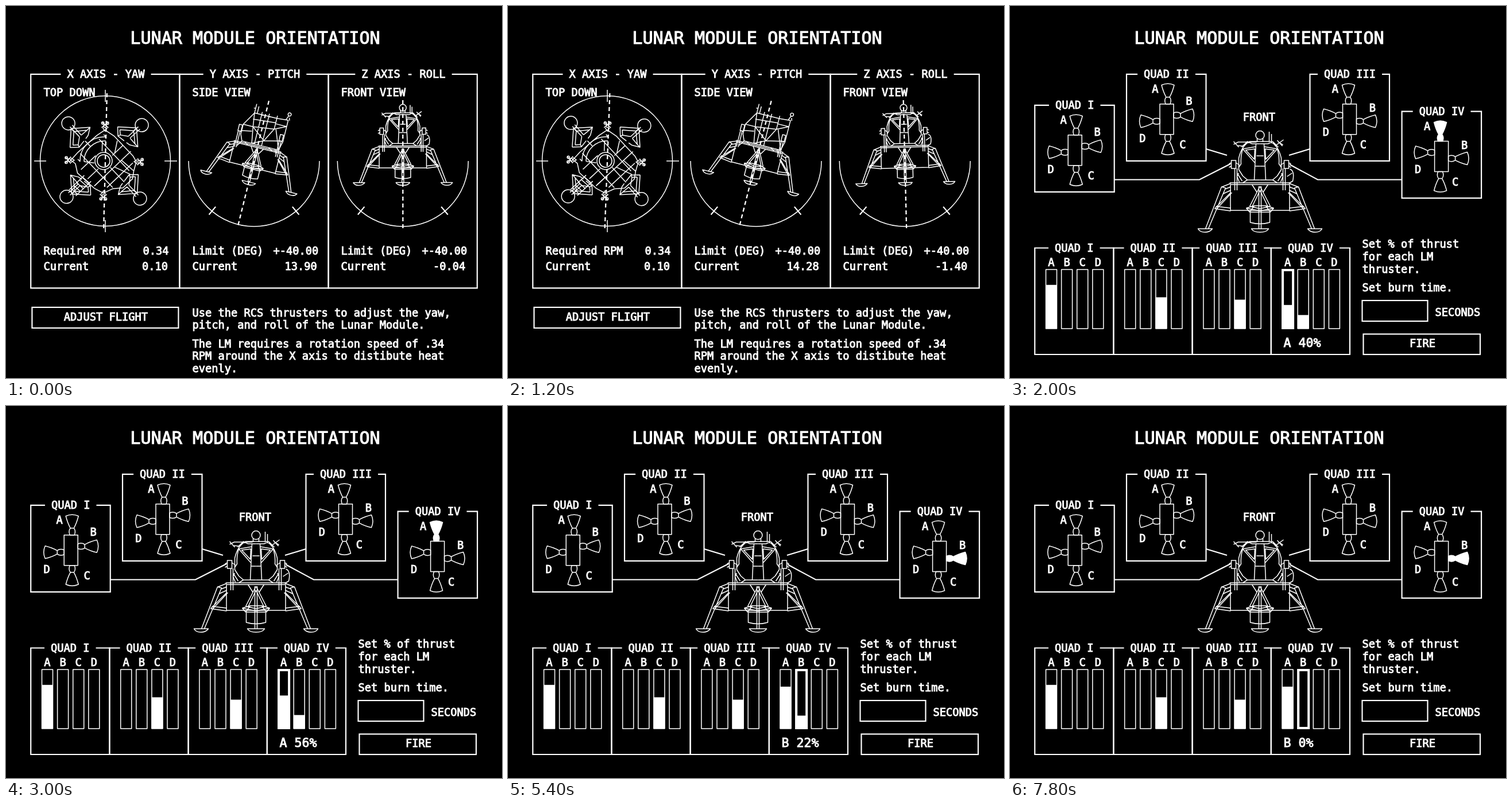
These frames come from a looping animation (864 px wide and 648 px high, 8000 ms). An HTML page:

```html
<!DOCTYPE html>
<html lang="en">
<head>
<meta charset="utf-8">
<title>Lunar Module Orientation</title>
<style>
html, body { margin: 0; width: 100%; height: 100%; overflow: hidden; background: #000; }
svg { display: block; width: 100%; height: 100%; fill: none; stroke: #fff; stroke-width: 2.16; }
text { font: 18.7px "DejaVu Sans Mono", monospace; fill: #fff; stroke-width: .95; white-space: pre; }
.mid { text-anchor: middle; }
.title { font-size: 30.15px; stroke-width: 1.1; }
.level { font-size: 21.6px; }
.thin, .thin * { stroke-width: 1.5; vector-effect: non-scaling-stroke; }
.thin { stroke-linejoin: round; }
.axis { stroke-width: 2.3; stroke-dasharray: 7 5; }
.solid { fill: #fff; }
</style>
</head>
<body>
<svg id="stage" viewBox="0 0 864 648"></svg>
<script>
const LOOP = 8000, STEP = 200, CHAR = 11.26, ADJUST = 2000;
const stage = document.getElementById('stage');

const path = (d, attrs = '') => `<path d="${d}" ${attrs}/>`;
const rect = (x, y, w, h, attrs = '') => `<rect x="${x}" y="${y}" width="${w}" height="${h}" ${attrs}/>`;
const circle = (x, y, r) => `<circle cx="${x}" cy="${y}" r="${r}"/>`;
const label = (x, y, s, attrs = '') => `<text x="${x}" y="${y}" ${attrs}>${s}</text>`;
const mid = (x, y, s) => label(x, y, s, 'class="mid"');
const group = (transform, body, attrs = '') => `<g transform="${transform}" ${attrs}>${body}</g>`;
const mirror = d => path(d) + group('scale(-1 1)', path(d));
const clamp = v => Math.max(0, Math.min(1, v));

// Box whose top edge is broken by its heading
function titled(x, y, w, h, heading, cx = x + w / 2) {
  const gap = heading.length * CHAR / 2 + 11;
  return path(`M${cx - gap} ${y}H${x}V${y + h}H${x + w}V${y}H${cx + gap}`) + mid(cx, y + 6.5, heading);
}

// Spacecraft parts: origin on the rotation axis
const descent =
  rect(-51.5, -30, 103, 45) + path('M-53-33H53') +
  mirror('M60-24L67-26 95 47H90ZM83 47H108Q105 53 96 53T83 47ZM51-32L66-26M51-26L61-22M51-20L64-14M51 16L79 12M51 11L77 8M51-16L79 12M49-16L76 13') +
  mirror('M0-27L18 8M0-20L14 9M24 11L10 7H0M24 11L18 18H0M24 11L0 16M10 7L18 18M0 12L18 8M14-30L5-16') +
  path('M-2-27V47M2-27V47M-17 19V36Q0 41 17 36V19M-15 47H15Q12 53 0 53T-15 47Z');

const front = descent + circle(0, -116, 7.5) +
  mirror('M5-110V-104M0-105H18Q32-98 37-76V-56L30-45 22-38H0M0-101H14L22-105 32-95M7-101L10-38M6-80H0M8-62H0M9-92L25-90 10-74ZM7-96L30-92 9-68M30-92Q34-80 33-66L37-60') +
  mirror('M42-72H50V-58H42ZM40-58V-20M44-58V-20M36-64L42-68M37-50L40-44M40-50L31-36M40-44L36-34M50-68L54-66M50-62L54-60M22-38L30-33') +
  path('M-46-105L-37-95M-46-100L-38-104H-6M-40-98L-30-97-22-104M16-104V-122M20-104V-118M26-97L41-108M30-107L39-97M32-104L40-99M52-57Q61-54 57-36L50-32M56-50L47-44');

const side = descent +
  path('M-24-102H26L51-104V-56L46-36H-36L-42-50V-72ZM-24-102L-20-72 26-78V-108M-42-72H-20L-14-36M26-78L51-90M-20-72L10-48 26-78M10-48L46-56M10-48L-14-36M-8-108V-36M8-108V-36M26-90H51M30-78L46-36M-42-58L-20-62M-24-88L26-92') +
  path('M-24-102V-122M-18-102V-118M-28-112H-24M46-104L50-114M54-104L52-110') + circle(51, -117, 3.5) +
  path('M-50-70H-43V-56H-50ZM-49-56V-20M-45-56V-20M42-70H49V-56H42ZM43-56V-20M47-56V-20M-36-36L-44-24M38-36L44-24M-30-36L-22-31M24-36L32-31');

const leg = circle(64, -64, 11.5) +
  path('M58-61L41-44M61-57L44-41M22-60L55-59 58-26 44-29M26-55L50-54 53-31M22-60L23-44 34-36M26-55L27-46 41-44M44-29L38-33M53-31L44-41M23-44L27-46M50-54L55-59M53-31L58-26');
const jet = path('M-6-68L6-58M6-68L-6-58M-4-58L0-52 4-58') + circle(-4, -66, 2.2) + circle(4, -66, 2.2) + circle(0, -61, 2.5);
const corners = [0, 90, 180, 270].map(a => group(`rotate(${a})`, leg + jet)).join('');
const above = corners +
  path('M0-54L16-44 50-10 56 0 52 16 50 30 34 46 16 48 0 56-16 48-46 22-50 6-58 0-46-14-14-44Z') +
  path('M-42 2A42 42 0 0 1 2-42M-35 2A36 36 0 0 1 2-35M-46-2L-42 2M-2-46L2-42M-40 16L-15-9M-28 32L-10 14M14-10L32-28M-16 44L46-18M6 46L50 2') +
  path('M-10-38L44 16M-42-12L16 46M-34-34L-25-25M11 11L36 36M-4-17V-35M-17 4L-35 2M18 10L46 22M18-14L22-36M-16 44L4 24M30-2L52 16') +
  circle(-1, 0, 15) + circle(-1, 0, 11) +
  path('M-60 52L-34 26M-48 62L-22 36M-57 49L-45 59M-52 44L-40 54M-47 39L-35 49M-42 34L-30 44M-37 29L-25 39');

function dial(cx) {
  const tick = a => group(`rotate(${a})`, path('M0 104V122'));
  return group(`translate(${cx} 270)`, path('M-114 0A114 114 0 0 0 114 0', 'class="thin"') + tick(40) + tick(-40));
}

function attitude() {
  const craft = (id, cx, body, scale, y1, y2) => group(`translate(${cx} 270)`,
    `<g id="${id}">${group(scale, body, 'class="thin"')}${path(`M0 ${y1}V${y2}`, 'class="axis"')}</g>`);
  const rows = (x, name, limit, xLimit, xNow, id) =>
    label(x, 432.5, name) + label(xLimit, 432.5, limit) + label(x, 459.5, 'Current') + label(xNow, 459.5, '0.10', `id="${id}"`);
  const copy = [[541, 'Use the RCS thrusters to adjust the yaw,'], [562, 'pitch, and roll of the Lunar Module.'],
    [595, 'The LM requires a rotation speed of .34'], [616, 'RPM around the X axis to distibute heat'], [638, 'evenly.']];
  return titled(43.2, 118.8, 259.2, 372.6, 'X AXIS - YAW', 174) +
    titled(302.4, 118.8, 259.2, 372.6, 'Y AXIS - PITCH', 433.5) +
    titled(561.6, 118.8, 259.2, 372.6, 'Z AXIS - ROLL', 692.5) +
    label(65.5, 157, 'TOP DOWN') + label(324.5, 157, 'SIDE VIEW') + label(583.5, 157, 'FRONT VIEW') +
    group('translate(173 270)', circle(0, 0, 113.5) + path('M-124 0H-103M103 0H125M0-124V-103M0 103V124'), 'class="thin"') +
    dial(432) + dial(691.3) +
    craft('yaw', 173, above, 'translate(-2 0)', -118, 120) +
    craft('pitch', 432, side, 'scale(.8)', -108, 120) +
    craft('roll', 691.3, front, 'scale(.8)', -106, 120) +
    rows(65.5, 'Required RPM', '0.34', 238.5, 237, 'yawText') +
    rows(324.5, 'Limit (DEG)', '+-40.00', 465.5, 485.5, 'pitchText') +
    rows(583.5, 'Limit (DEG)', '+-40.00', 724.5, 744, 'rollText') +
    rect(45.4, 524.9, 255, 36) + mid(174, 548, 'ADJUST FLIGHT') +
    copy.map(([y, s]) => label(324.5, y, s)).join('');
}

const nozzle = 'M-11-33Q0-38 11-33Q8-21 3-12Q7-7 4 0H-4Q-7-7-3-12Q-8-21-11-33ZM-3-12H3';

// Thruster cluster; the right-hand pair is flipped
function quad(x, y, name, flip, id) {
  const at = (px, py, a, n) => group(`translate(${px} ${py}) rotate(${a})`, path(nozzle, `id="${id}${n}"`));
  const [left, right] = flip ? 'BD' : 'DB';
  const body = rect(58, 52, 24, 53) + at(72, 52, 0, 'A') + at(82, 71.5, 90, right) +
    at(72, 105, 180, 'C') + at(58, 82, -90, left);
  const marks = flip ? [44, 32, 109, 65, 93, 129, 28, 107] : [50, 32, 109, 53, 98, 129, 28, 118];
  return titled(x, y, 138.5, 151, name, x + 69.5) + group(`translate(${x} ${y})`,
    group(flip ? 'translate(139 0) scale(-1 1)' : '', body, 'class="thin"') +
    [...'ABCD'].map((c, i) => mid(marks[2 * i], marks[2 * i + 1], c)).join(''));
}

const BASE = 562, FULL = 103;
const bar = (x, pct, id = '') =>
  rect(x, BASE - FULL * pct / 100, 20, FULL * pct / 100, `class="solid" stroke="none" ${id && `id="${id}Fill"`}`) +
  rect(x + .5, BASE - FULL, 19, FULL, 'class="thin"') +
  (id && rect(x + 1.5, BASE - FULL + 1, 18, FULL - 2, `id="${id}Frame" stroke-width="4"`));

function thrust() {
  const levels = [[74, 0, 0, 0], [0, 0, 53, 0], [0, 0, 49, 0], [40, 23, 0, 0]];
  const names = ['QUAD I', 'QUAD II', 'QUAD III', 'QUAD IV'];
  const panels = levels.map((row, q) => {
    const x = 43.2 + 137.2 * q;
    return titled(x, 421.5, 137.2, 185.5, names[q]) + row.map((pct, i) => {
      const bx = x + 18.8 + 27.1 * i;
      return bar(bx, pct, q === 3 && i < 2 ? 'bar' + 'AB'[i] : '') + mid(bx + 10, 453, 'ABCD'[i]);
    }).join('');
  }).join('');
  const copy = [[421, 'Set % of thrust'], [443, 'for each LM'], [465, 'thruster.'], [497, 'Set burn time.']];
  return quad(43.2, 172.8, names[0], false, 'q1') + quad(203, 118.8, names[1], false, 'q2') +
    quad(522.5, 118.8, names[2], true, 'q3') + quad(682.6, 183.6, names[3], true, 'q4') +
    path('M182 302.5H330L384 275M341.5 249L378 260M522.5 249L486 260M683 302.5H536L487 276') +
    mid(434, 200, 'FRONT') + group('translate(435.5 341)', front, 'class="thin"') + panels +
    label(476.5, 594, '', 'id="level" class="level"') +
    copy.map(([y, s]) => label(613.5, y, s)).join('') +
    rect(613.5, 513, 114, 36) + label(740.5, 540, 'SECONDS') +
    rect(615.5, 571.5, 203.5, 35.5) + mid(718.5, 594, 'FIRE');
}

stage.innerHTML = rect(0, 0, 864, 648, 'fill="#000" stroke="none"') +
  label(434, 66, 'LUNAR MODULE ORIENTATION', 'class="mid title"') +
  `<g id="attitude">${attitude()}</g><g id="thrust">${thrust()}</g>`;

const el = id => document.getElementById(id);
const show = (id, on) => el(id).setAttribute('display', on ? 'inline' : 'none');
const turn = (id, deg) => el(id).setAttribute('transform', `rotate(${deg})`);

function setBar(name, pct, active) {
  const h = FULL * pct / 100, fill = el(`bar${name}Fill`);
  fill.setAttribute('y', BASE - h);
  fill.setAttribute('height', h);
  show(`bar${name}Frame`, active);
  el('q4' + name).setAttribute('class', active ? 'solid' : '');
}

function draw(ms) {
  const n = Math.floor(ms / STEP), t = n * STEP;
  show('attitude', t < ADJUST);
  show('thrust', t >= ADJUST);
  if (t < ADJUST) {
    const pitch = 13.903 + .0635 * n, roll = -.04 - .23 * n + .0006 * n * n;
    turn('yaw', 1.4 + .6 * t / 1000);
    turn('pitch', pitch);
    turn('roll', roll);
    el('pitchText').textContent = pitch.toFixed(2);
    el('rollText').textContent = roll.toFixed(2);
    return;
  }
  const a = Math.round(40 + 22 * clamp((t - 2000) / 1400) + 9 * clamp((t - 3800) / 800));
  const b = t < 5400 ? 23 : Math.round(22 - 22 * clamp((t - 5400) / 1600));
  const onB = t >= 5000;
  setBar('A', a, t < 3600 || (t >= 4000 && t < 4800));
  setBar('B', b, onB);
  el('level').textContent = onB ? `B ${b}%` : `A ${a}%`;
}

const start = performance.now();
function tick() {
  draw((performance.now() - start) % LOOP);
  requestAnimationFrame(tick);
}
tick();
</script>
</body>
</html>
```
